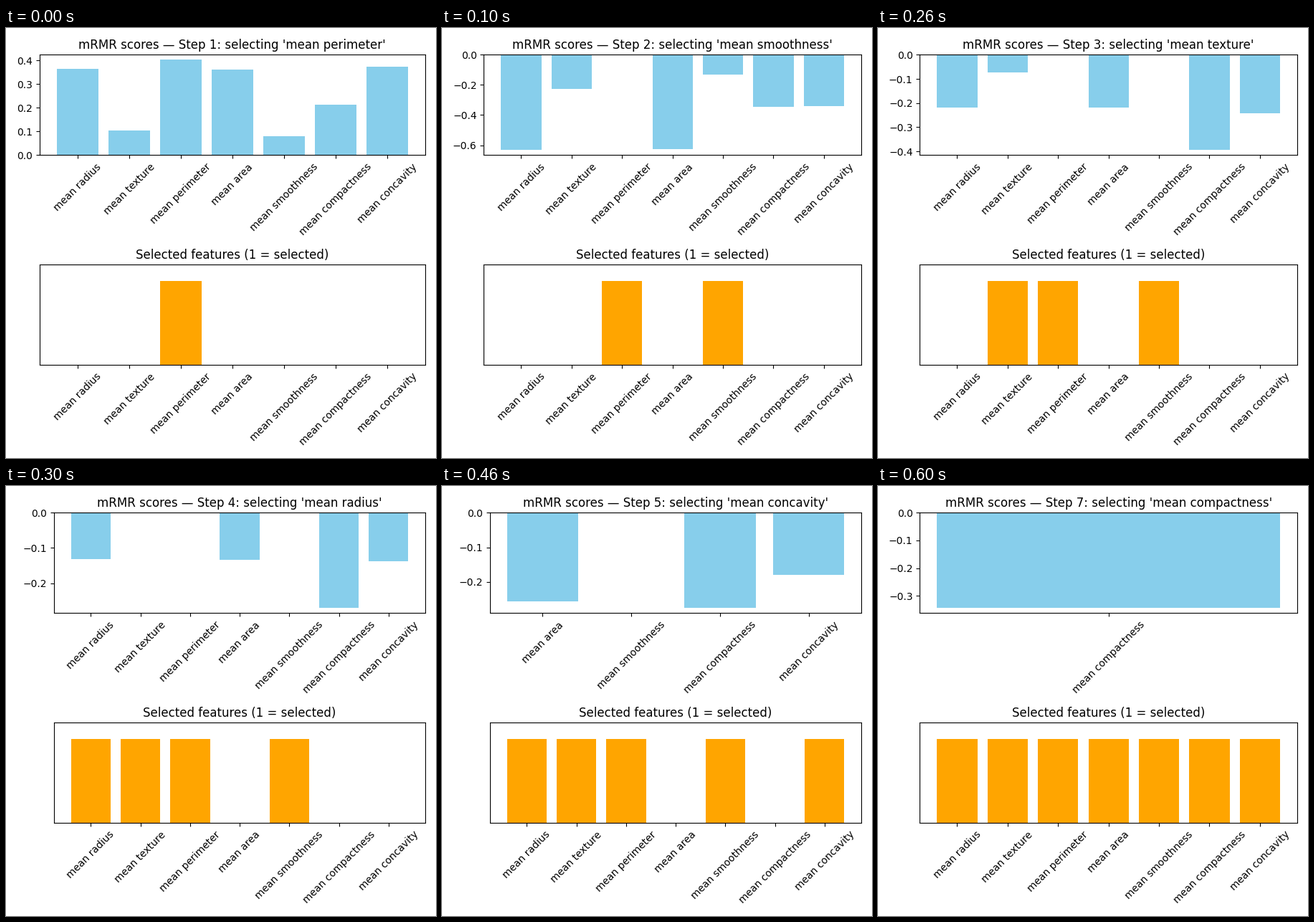
A matplotlib script that plays this animation: 600 px wide and 600 px high, repeating every 700 ms.

```python
import numpy as np
import matplotlib.pyplot as plt
from matplotlib.animation import FuncAnimation

# Per feature: relevance to the class, then loadings on three shared factors
# (size, shape, grain) whose products give the pairwise correlations.
MODEL = {
    "radius": (0.3655, 1, 0, 0),
    "texture": (0.1035, 0.324, 0.1, 1),
    "perimeter": (0.4045, 0.998, 0.06, 0),
    "area": (0.361, 0.987, 0.01, 0),
    "smoothness": (0.08, 0.171, 0.656, -0.097),
    "compactness": (0.2135, 0.506, 0.871, -0.0145),
    "concavity": (0.374, 0.677, 0.621, 0.021),
}
NAMES = [f"mean {name}" for name in MODEL]
RELEVANCE, *FACTORS = np.array(list(MODEL.values())).T
REDUNDANCY = np.abs(sum(np.outer(f, f) for f in FACTORS))


def mrmr_steps():
    """Greedy selection: relevance minus mean redundancy with the chosen set."""
    chosen, steps = [], []
    for _ in NAMES:
        scores = RELEVANCE.copy()
        if chosen:
            scores -= REDUNDANCY[chosen].mean(axis=0)
            scores[chosen] = np.nan
        chosen.append(int(np.nanargmax(scores)))
        steps.append((scores, list(chosen)))
    return steps


STEPS = mrmr_steps()
fig = plt.figure(figsize=(6, 6), dpi=100)


def bar_chart(ax, values, color, title):
    ax.bar(NAMES, values, color=color)
    ax.set_title(title)
    ax.tick_params(axis="x", rotation=45)


def draw(step):
    fig.clear()
    # Start from the default margins so the layout never depends on history.
    fig.subplots_adjust(left=0.125, right=0.9, bottom=0.11, top=0.88,
                        wspace=0.2, hspace=0.2)
    top, bottom = fig.subplots(2, 1)

    scores, chosen = STEPS[step]
    bar_chart(top, scores, "skyblue",
              f"mRMR scores — Step {step + 1}: selecting '{NAMES[chosen[-1]]}'")

    bar_chart(bottom, np.isin(range(len(NAMES)), chosen).astype(int), "orange",
              "Selected features (1 = selected)")
    bottom.set_ylim(0, 1.2)
    bottom.set_yticks([])

    fig.tight_layout()
    return []


anim = FuncAnimation(fig, draw, frames=len(STEPS), interval=100,
                     init_func=lambda: [], repeat=True, repeat_delay=0)
plt.show()
```
